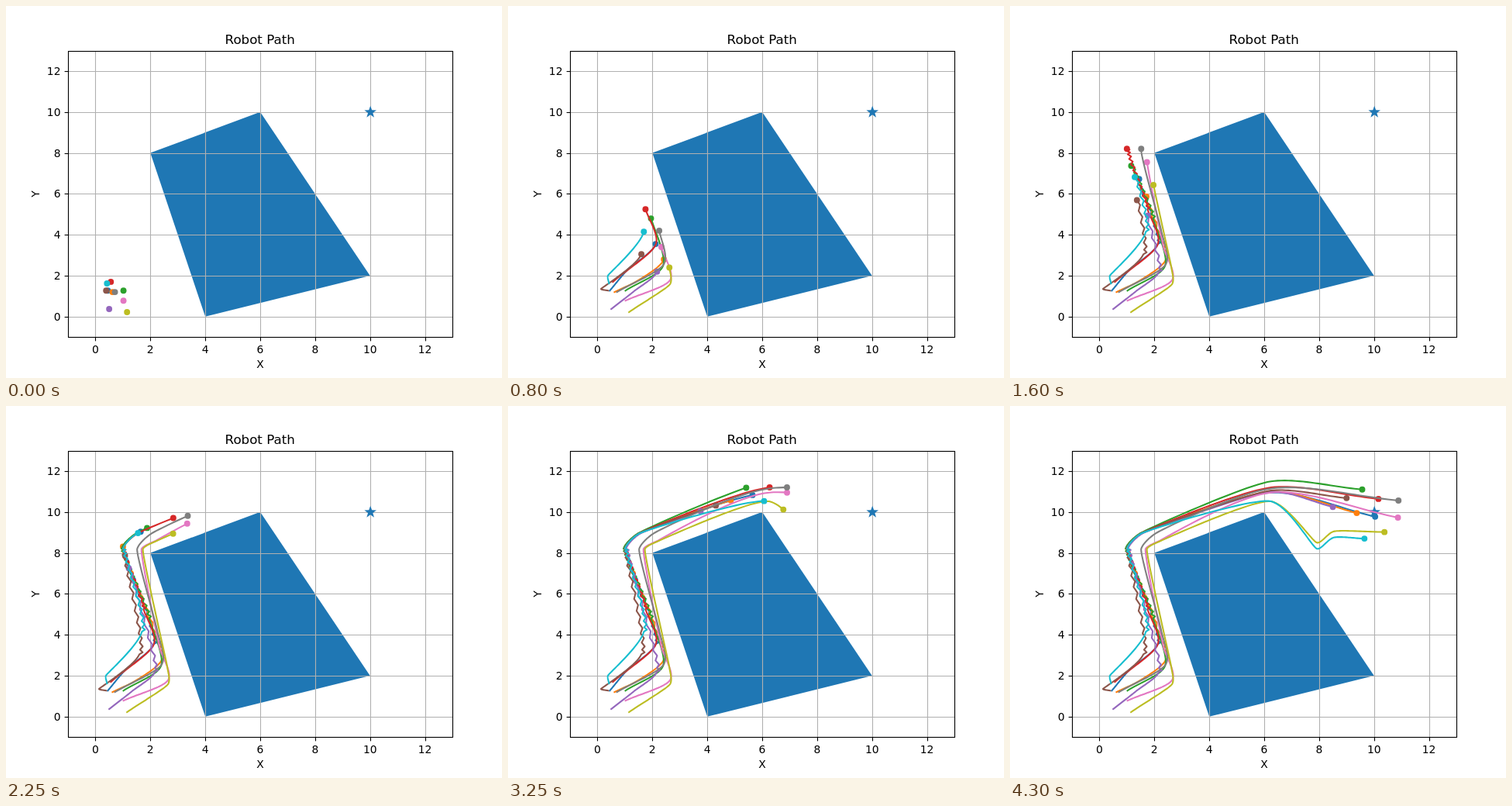
An HTML page that plays this animation: 640x480 px, repeating every 4350 ms.

```html
<!DOCTYPE html>
<html lang="en">
<head>
<meta charset="utf-8">
<title>Robot Path</title>
<style>
html, body { margin: 0; width: 100%; height: 100%; overflow: hidden; background: #fff; }
svg { display: block; width: 640px; height: 480px; }
text { font: 13.89px "DejaVu Sans", sans-serif; text-anchor: middle; }
.title { font-size: 16.67px; }
.end { text-anchor: end; }
.grid { stroke: #b0b0b0; stroke-width: 1.11; }
.axis { stroke: #000; stroke-width: 1.11; fill: none; }
.trail { fill: none; stroke-width: 2.08; stroke-linejoin: round; stroke-linecap: square; }
</style>
</head>
<body>
<svg id="plot" viewBox="0 0 640 480"></svg>
<script>
const plot = document.getElementById('plot');
const STEP = 50, FRAMES = 87;
const MEET_STEP = 16; // step at which every robot is at its `meet` point
const DETAIL = 24;    // samples per curve segment
const BLUE = '#1f77b4';

const px = x => 80 + (x + 1) * 496 / 14;
const py = y => 427.2 - (y + 1) * 26.4;
const snap = v => Math.floor(v + 0.5) + 0.5;

function add(tag, attrs, text) {
  const el = document.createElementNS('http://www.w3.org/2000/svg', tag);
  for (const key in attrs) el.setAttribute(key, attrs[key]);
  if (text !== undefined) el.textContent = text;
  return plot.appendChild(el);
}

function line(cls, x1, y1, x2, y2) {
  add('line', { class: cls, x1, y1, x2, y2 });
}

function drawAxes() {
  const corners = [[2, 8], [6, 10], [10, 2], [4, 0]];
  add('polygon', { fill: BLUE, points: corners.map(([x, y]) => [px(x), py(y)]).join(' ') });
  for (let v = 0; v <= 12; v += 2) {
    const x = snap(px(v)), y = snap(py(v));
    line('grid', x, 58, x, 427);
    line('grid', 80, y, 576, y);
  }
  for (let v = 0; v <= 12; v += 2) {
    const x = snap(px(v)), y = snap(py(v));
    line('axis', x, 427.5, x, 432.4);
    line('axis', 75.6, y, 80.5, y);
    add('text', { x: px(v), y: 448 }, v);
    add('text', { class: 'end', x: 70.5, y: Math.round(py(v) + 5) }, v);
  }
  add('rect', { class: 'axis', x: 80.5, y: 58.5, width: 496, height: 369 });
  add('text', { x: 328, y: 467 }, 'X');
  add('text', { transform: 'translate(43 242.4) rotate(-90)' }, 'Y');
  add('text', { class: 'title', x: 327.7, y: 49 }, 'Robot Path');
}

function drawStar() {
  const points = [];
  for (let i = 0; i < 10; i++) {
    const r = i % 2 ? 3.3 : 8.2, a = i * Math.PI / 5;
    points.push([470.2 + r * Math.sin(a), 137 - r * Math.cos(a)]);
  }
  add('polygon', { points: points.join(' '), fill: BLUE });
}

const dist = (a, b) => Math.hypot(b.x - a.x, b.y - a.y);
const knot = (x, y, t) => ({ x, y, t });

// Slope of the curve at knot i; it shrinks as the turn gets sharper.
function tangent(knots, i) {
  const a = knots[i - 1], b = knots[i], c = knots[i + 1];
  if (!a) return { x: c.x - b.x, y: c.y - b.y };
  if (!c) return { x: b.x - a.x, y: b.y - a.y };
  const h0 = dist(a, b), h1 = dist(b, c), k = 0.45 * Math.min(h0, h1);
  const mix = d => k * ((b[d] - a[d]) / h0 + (c[d] - b[d]) / h1);
  return { x: mix('x'), y: mix('y') };
}

function hermite(a, b, m, n, s) {
  const q = 1 - s;
  return a * q * q * (1 + 2 * s) + b * s * s * (3 - 2 * s) + m * s * q * q - n * s * s * q;
}

// Smooth curve through the knots; robots close to the wall rattle along it.
function sampleCurve(knots, rattles) {
  const out = [{ ...knots[0] }];
  for (let i = 1; i < knots.length; i++) {
    const a = knots[i - 1], b = knots[i];
    const m = tangent(knots, i - 1), n = tangent(knots, i);
    const shake = rattles && a.t === MEET_STEP ? 0.1 : 0;
    for (let j = 1; j <= DETAIL; j++) {
      const s = j / DETAIL;
      out.push({
        x: hermite(a.x, b.x, m.x, n.x, s) + shake * (j % 2),
        y: hermite(a.y, b.y, m.y, n.y, s),
        t: j === DETAIL ? b.t : undefined
      });
    }
  }
  return out;
}

// Between two timed points the speed is constant.
function fillTimes(path) {
  let first = 0;
  for (let i = 1; i < path.length; i++) {
    if (path[i].t === undefined) continue;
    const run = path.slice(first, i + 1), t0 = run[0].t, t1 = path[i].t;
    let sum = 0;
    const sums = run.map((p, j) => sum += j ? dist(run[j - 1], p) : 0);
    run.forEach((p, j) => p.t = t0 + (t1 - t0) * sums[j] / sum);
    first = i;
  }
  return path;
}

const robots = [];

// start -> via -> meet -> up the wall -> round its top -> over the peak -> end
function robot(color, { start, via, meet, wall, turn, peak, dip, end }) {
  const rise = wall > 1.6 ? 0.4 : 0.75;
  const knots = [
    knot(...start, 0), knot(...via), knot(...meet, MEET_STEP),
    knot(wall, 8.2, turn), knot(wall + 0.52, 8.2 + rise), knot(6.25, peak)
  ];
  if (dip) knots.push(knot(7.93, dip), knot(8.53, dip + 0.55));
  knots.push(knot(...end, FRAMES - 1));
  const path = fillTimes(sampleCurve(knots, wall < 1.2));
  robots.push({
    path: path.map(p => ({ x: px(p.x), y: py(p.y), t: p.t })),
    trail: add('polyline', { class: 'trail', stroke: color }),
    dot: add('circle', { r: 3.95, fill: color })
  });
}

drawAxes();
drawStar();

robot(BLUE, { start: [0.45, 1.27], via: [1.1, 2.3], meet: [2.12, 3.55], wall: 0.98, turn: 40, peak: 10.95, end: [10.04, 9.77] });
robot('#ff7f0e', { start: [0.62, 1.2], via: [1.48, 1.77], meet: [2.42, 2.8], wall: 0.97, turn: 44.5, peak: 11, end: [9.37, 9.95] });
robot('#2ca02c', { start: [1.02, 1.27], via: [2.38, 2.45], meet: [1.95, 4.8], wall: 0.95, turn: 38, peak: 11.5, end: [9.57, 11.1] });
robot('#d62728', { start: [0.56, 1.7], via: [2.13, 3.55], meet: [1.75, 5.25], wall: 1, turn: 32, peak: 11.2, end: [10.16, 10.64] });
robot('#9467bd', { start: [0.5, 0.37], via: [1.34, 1.25], meet: [2.17, 2.2], wall: 1.04, turn: 51, peak: 11, end: [8.5, 10.25] });
robot('#8c564b', { start: [0.39, 1.27], via: [0.13, 1.35], meet: [1.6, 3.05], wall: 0.98, turn: 47.5, peak: 11.05, end: [9, 10.68] });
robot('#e377c2', { start: [1.02, 0.78], via: [2.65, 1.8], meet: [2.33, 3.4], wall: 1.68, turn: 34.5, peak: 10.95, end: [10.87, 9.73] });
robot('#7f7f7f', { start: [0.71, 1.2], via: [2.42, 2.57], meet: [2.25, 4.2], wall: 1.52, turn: 32, peak: 11.15, end: [10.89, 10.56] });
robot('#bcbd22', { start: [1.15, 0.22], via: [2.65, 1.6], meet: [2.62, 2.4], wall: 1.73, turn: 39, peak: 10.52, dip: 8.5, end: [10.38, 9.02] });
robot('#17becf', { start: [0.42, 1.62], via: [0.38, 2], meet: [1.69, 4.15], wall: 1, turn: 41, peak: 10.52, dip: 8.2, end: [9.65, 8.7] });

function pose({ path, trail, dot }, step) {
  let i = 1;
  while (i < path.length - 1 && path[i].t < step) i++;
  const a = path[i - 1], b = path[i];
  const k = Math.min(1, (step - a.t) / (b.t - a.t));
  const x = a.x + (b.x - a.x) * k, y = a.y + (b.y - a.y) * k;
  const points = path.slice(0, i).map(p => [p.x, p.y]);
  trail.setAttribute('points', step ? [...points, [x, y]].join(' ') : '');
  dot.setAttribute('cx', x);
  dot.setAttribute('cy', y);
}

const begin = performance.now();
let shown = -1;
function tick() {
  const step = Math.floor((performance.now() - begin) / STEP) % FRAMES;
  if (step !== shown) {
    robots.forEach(r => pose(r, step));
    shown = step;
  }
  requestAnimationFrame(tick);
}
tick();
</script>
</body>
</html>
```
